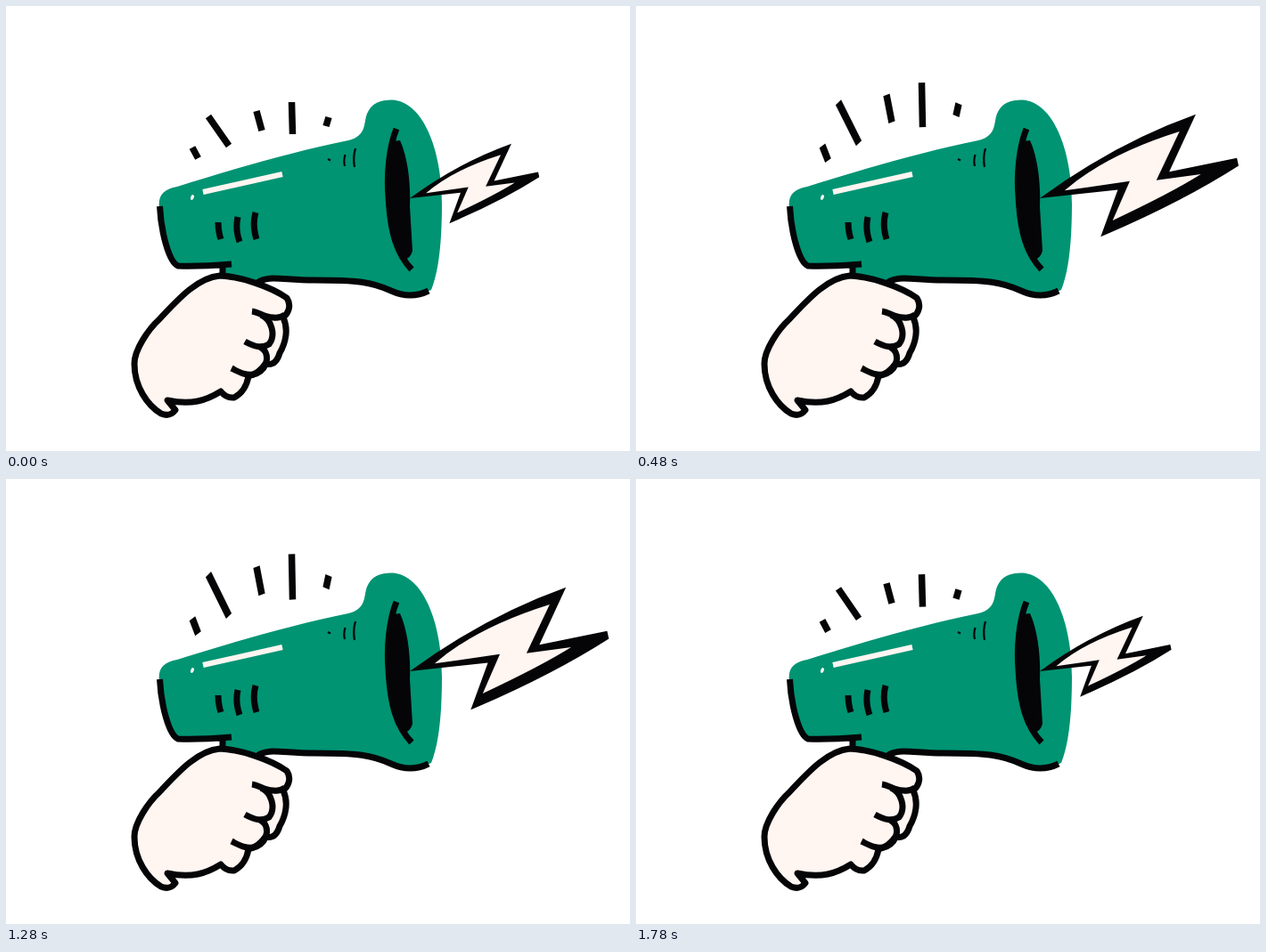
Animation, 700 px wide and 500 px high, one loop 1800 ms. Source, as an HTML page:

```html
<!DOCTYPE html>
<html lang="en">
<head>
<meta charset="utf-8">
<title>Megaphone</title>
<style>
html, body { margin: 0; width: 100%; height: 100%; overflow: hidden; background: #fff; }
svg { display: block; width: 100vw; height: 100vh; }
.line { fill: none; stroke: #050507; stroke-width: 7; }
.thin { stroke-width: 2.2; }
.ray { stroke-width: 7.5; }
.shine { fill: none; stroke: #fff5f1; stroke-width: 6; }
.ink { fill: #050507; }
.cream { fill: #fff5f1; }
.green { fill: #009473; }
</style>
</head>
<body>
<svg viewBox="0 0 700 500">
  <!-- horn -->
  <path class="green" d="M172 228C170 212 177 206 192 203C255 183 325 163 384 151C405 146 401 131 405 121C410 109 420 105.500 433 105.500C468 107 489 162 489 222C489 262 486 297 477 319C455 329 443 325 430 318C412 309 395 308 345 308C310 307 297 302 285 311L243 305L242 291L193 292C181 282 175 255 172 228Z"/>
  <path class="line" d="M172.500 225C174 255 183 288 193 292Q215 293 253 290M243 291V304M282 311C294 302 310 308 345 308C395 308 410 310 432 320Q454 330 474 320"/>
  <path class="line" d="M238 243Q238 253 241 262M260 237Q257 251 262 265M280 232Q276 246 281 262"/>
  <path class="line thin" d="M380.500 167Q378.500 174 380 180M392 160Q389 170 391 181M361 172L364 173.500"/>
  <path class="shine" d="M221 209L310 189"/>
  <ellipse class="cream" cx="209" cy="215" rx="1.800" ry="3" transform="rotate(20 209 215)"/>
  <path class="line" d="M438 138C430 157 427 190 429 213C431 256 439 279 455 296"/>
  <path class="ink" d="M434 152L442 151C452 173 454 205 453 225L456 275Q454 283 447 285C429 255 425 190 434 152Z"/>

  <!-- hand -->
  <path class="cream" stroke="#050507" stroke-width="7" stroke-linejoin="round" d="M240 303C264 304 298 316 315 328C321 337 316 346 311 350C317 363 314 378 307 390C304 400 299 404 291 402Q284 413 272 416Q269 433 256 440Q247 441 241 433C225 443 208 449 181 443L190 454Q184 462 174 458C159 449 144 428 144 402C144 386 160 363 172 352C195 327 216 305 240 303Z"/>
  <path class="line" d="M276 343C285 344 288 350 300 350Q307 351 313 347M286 347C298 352 303 370 295 380C287 385 279 383 268 377M285 383C297 389 294 407 281 413C270 417 261 411 253 407"/>

  <g id="rays">
    <path class="line ray" d="M209 159L215.500 171M227 124L250 157M281 118L287 140M320.500 108L321.500 144M362 125L359 135"/>
  </g>
  <!-- drawn at full size, with the tail at 453 216 -->
  <g id="bolt">
    <path class="ink" d="M453 216Q540 152 635 118L604 185L683 169L685 178Q618 221 524 261L544 206Z"/>
    <path class="cream" d="M482 207Q530 165 616 138L589 195L641 188Q606 210 538 242L558 196Z"/>
  </g>
</svg>
<script>
const LOOP = 1800, HALF = LOOP / 2;
const rays = document.getElementById('rays');
const bolt = document.getElementById('bolt');

const mix = (a, b, k) => a + (b - a) * k;

// Cubic Bezier easing: linear start, soft finish; x2 sets how early it slows down
function ease(u, x2) {
  const bez = (s, a, b) => 3 * (1 - s) ** 2 * s * a + 3 * (1 - s) * s * s * b + s ** 3;
  let lo = 0, hi = 1;
  for (let i = 0; i < 24; i++) {
    const mid = (lo + hi) / 2;
    if (bez(mid, 1 / 6, x2) < u) lo = mid; else hi = mid;
  }
  return bez(lo, 1 / 6, 1);
}

function scaleAbout(el, x, y, sx, sy) {
  el.setAttribute('transform', `translate(${x} ${y}) scale(${sx} ${sy}) translate(${-x} ${-y})`);
}

function draw(ms) {
  const t = ms % LOOP;
  const u = 1 - Math.abs(t - HALF) / HALF;
  const size = mix(0.626, 1, ease(u, t < HALF ? 0.093 : 0.19));
  scaleAbout(bolt, 453, 216, size, size);
  scaleAbout(rays, 0, 164.3, 1, mix(1, 1.578, ease(u, 2 / 3)));
}

let start;
function tick(now) {
  start ??= now;
  draw(now - start);
  requestAnimationFrame(tick);
}
draw(0);
requestAnimationFrame(tick);
</script>
</body>
</html>
```
